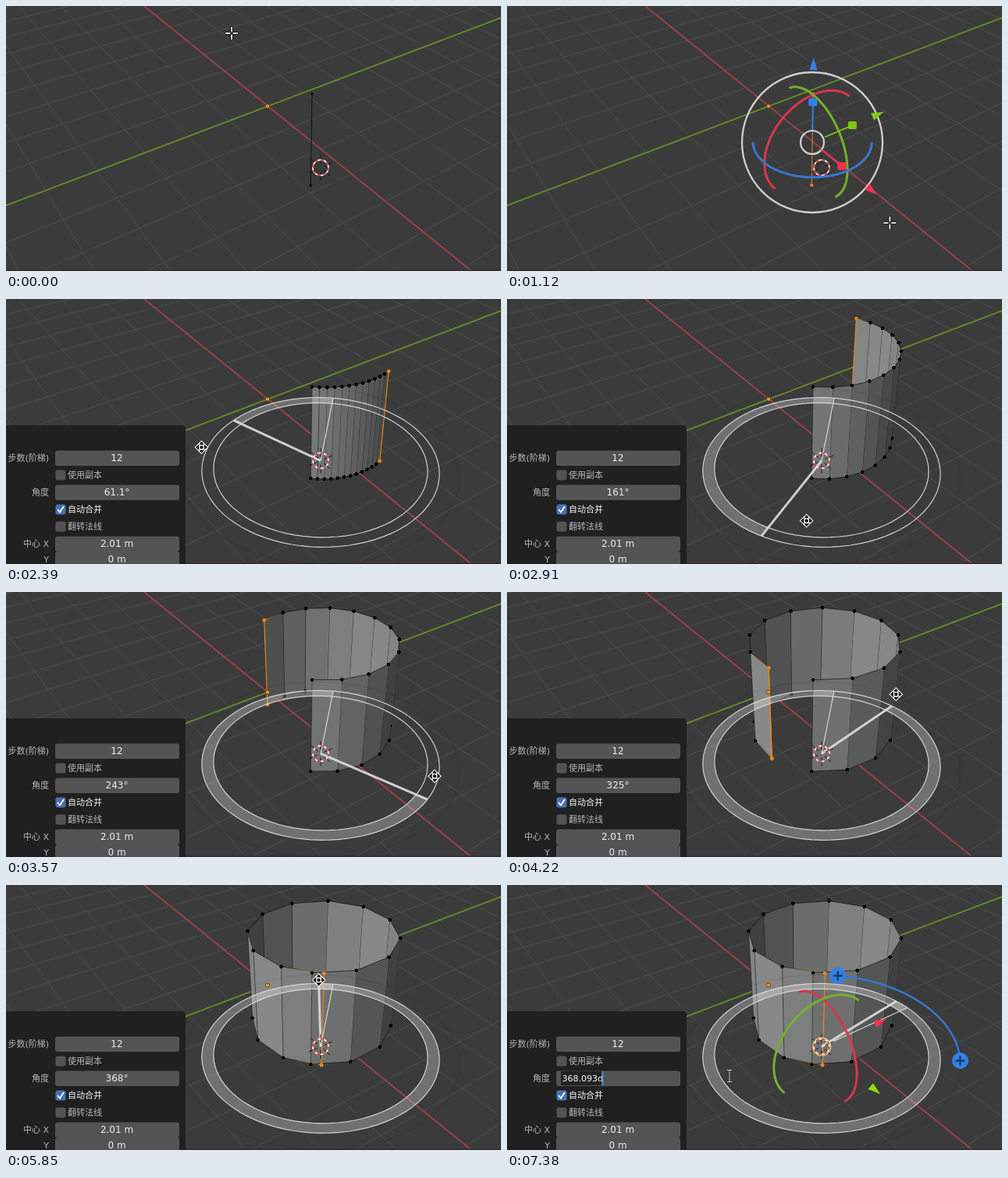
An HTML page with a canvas that plays this animation: 634 by 340 pixels, repeating every 8 s.

```html
<!DOCTYPE html>
<html lang="zh">
<head>
<meta charset="utf-8">
<style>
html, body { margin: 0; width: 100%; height: 100%; overflow: hidden; background: #3b3b3b; }
canvas { display: block; }
</style>
</head>
<body>
<canvas id="stage" width="634" height="340"></canvas>
<script>
const c = document.getElementById('stage').getContext('2d');
const FONT = '"DejaVu Sans", "Noto Sans CJK SC", "Noto Sans CJK", sans-serif';
const ORANGE = '#f0861a', RED = '#d9364c', GREEN = '#74b02b', BLUE = '#3579d0', WIRE = 'rgba(20,20,20,.75)';
const CENTER = 1.345, OUTER = 1.755, INNER = 1.585, ORBIT = 2.04;
const STEP = 74.2, SELECT = 600, TOOL = 1170, HOVER = 1400, DRAG = 1690, RELEASE = 5900, EDIT = 6720;

// Key points: [time, angle, pointer reach] and [time, x, y]
const spinKeys = [[1700, 2, 2.05], [2360, 61.1, 1.85], [2880, 161, 1.3], [4210, 325, 2.1], [5570, 368.093, 1.87]];
const mouseKeys = [[0, 289, 35], [290, 530, 292], [450, 530, 292], [600, 582, 288], [1095, 491, 280],
  [1470, 423, 116], [5840, 399, 123], [6640, 178, 240], [7180, 178, 240], [7320, 285, 245]];

function at(keys, t) {
  const i = keys.findIndex(k => k[0] > t);
  if (i < 0) return keys[keys.length - 1].slice(1);
  if (i === 0) return keys[0].slice(1);
  const p = keys[i - 1], q = keys[i], f = (t - p[0]) / (q[0] - p[0]);
  return p.slice(1).map((v, j) => v + (q[j + 1] - v) * f);
}

const rad = d => d * Math.PI / 180;
const depth = d => -.1007 * Math.cos(rad(d)) - .014 * Math.sin(rad(d));

// Perspective of a point at angle d, radius k, depth h below the rim
function polar(d, k, h = CENTER) {
  const u = k * Math.cos(rad(d)), v = k * Math.sin(rad(d));
  const w = 1 + .105 * h + k * depth(d);
  return [(406.8 + 39.5 * h - 54.3 * u + 91.13 * v) / w, (62.1 + 129.8 * h + 39.2 * u + 6.92 * v) / w];
}
const hub = polar(0, 0);

const floorW = (x, y) => 1.2268 - .0555 * x + .0415 * y;
function floorPt(x, y) {
  const w = floorW(x, y);
  return [(411.6 + 19.17 * x + 71.97 * y) / w, (158 + 23.43 * x - 16.51 * y) / w];
}

function trace(pts, close) {
  c.beginPath();
  pts.forEach(p => c.lineTo(p[0], p[1]));
  if (close) c.closePath();
}
function line(pts, color, width = 1, close = false) {
  trace(pts, close);
  c.strokeStyle = color;
  c.lineWidth = width;
  c.stroke();
}
function shape(pts, color) { trace(pts, true); c.fillStyle = color; c.fill(); }
function rect(x, y, w, h, color, r = 0) {
  c.beginPath();
  c.roundRect(x, y, w, h, r);
  c.fillStyle = color;
  c.fill();
}
function circle([x, y], r, fill, stroke, width = 1) {
  c.beginPath();
  c.arc(x, y, r, 0, 7);
  if (fill) { c.fillStyle = fill; c.fill(); }
  if (stroke) { c.strokeStyle = stroke; c.lineWidth = width; c.stroke(); }
}
const sweep = (from, to, fn) => Array.from({ length: 91 }, (_, i) => fn(from + (to - from) * i / 90));
const arc = (from, to, k) => sweep(from, to, d => polar(d, k));

function drawFloor() {
  rect(0, 0, 634, 340, '#3b3b3b');
  for (let i = -23; i < 24; i++) {
    if (!i) continue;
    line([floorPt(-40, i), floorPt((floorW(0, i) - .08) / .0555, i)], '#4a4a4a');
    line([floorPt(i, (.08 - floorW(i, 0)) / .0415), floorPt(i, 45)], '#4a4a4a');
  }
  line([[0, 256], [634, 15]], '#678f2a', 1.7);
  line([[177, 0], [595, 339]], '#a03f4a', 1.8);
  rect(0, 338.5, 634, 1.5, '#302b2d');
}

function drawEdge(selected) {
  const ends = [polar(0, 1, 0), polar(0, 1, 1)], color = selected ? ORANGE : '#111';
  line(ends, color);
  ends.forEach(p => circle(p, 2, color));
}

function shade(d) {
  const v = Math.round(Math.max(64, 86 + 50 * Math.cos(rad(d - 315))));
  return `rgb(${v - 1},${v + 1},${v + 1})`;
}

function drawMesh(angle) {
  const step = angle / 12, mid = i => (i + .5) * step;
  const [top, low] = [0, 1].map(h => Array.from({ length: 13 }, (_, i) => polar(i * step, 1, h)));
  const order = [...Array(12).keys()].sort((a, b) => depth(mid(b)) - depth(mid(a)));
  const lastEdge = () => {
    line([top[12], low[12]], ORANGE, 1.1);
    circle(top[12], 2.4, ORANGE);
    circle(low[12], 2.4, ORANGE);
  };
  for (const i of order) {
    const [a, b, p, q] = [top[i], top[i + 1], low[i], low[i + 1]];
    const outside = (b[0] - a[0]) * (p[1] - a[1]) - (b[1] - a[1]) * (p[0] - a[0]) > 0;
    shape([a, b, q, p], shade(mid(i) + (outside ? 0 : 180)));
    line([a, p], WIRE, .7);
    for (const [m, n] of [[a, b], [p, q]]) {
      const fade = c.createLinearGradient(...m, ...n);
      fade.addColorStop(0, WIRE);
      fade.addColorStop(1, i === 11 ? ORANGE : WIRE);
      line([m, n], fade);
    }
    [a, b, p, q].forEach(v => circle(v, 2.2, '#000'));
    if (i === 11) lastEdge();
  }
  if (angle > 300) lastEdge();
}

function drawDial(start, angle) {
  const white = 'rgba(222,222,222,.9)';
  for (let rest = angle, from = start; rest > 0; rest -= 360) {
    const to = from + Math.min(rest, 360);
    shape([...arc(from, to, OUTER), ...arc(to, from, INNER)], 'rgba(255,255,255,.27)');
  }
  line(arc(0, 360, OUTER), white, 1.2);
  line(arc(0, 360, INNER), white, 1.2);
  line([hub, polar(start, OUTER)], white, 1.2);
  line([hub, polar(start + angle, OUTER)], white, 3);
}

function drawCursor3d() {
  const [x, y] = hub;
  for (const [dx, dy] of [[0, 1], [.92, -.4], [.75, .66]])
    for (const s of [-5, 5, ])
      line([[x + s * dx, y + s * dy], [x + s * dx * 3.2, y + s * dy * 3.2]], '#151515');
  circle(hub, 10, null, '#f2f2f2', 1.6);
  c.setLineDash([3.93, 3.93]);
  circle(hub, 10, null, '#d8282c', 1.6);
  c.setLineDash([]);
}

// Handles share one set of screen axes
const AX = [45, 36.4], AY = [61.2, -26.1], AZ = [1, -61.2];
const along = ([x, y], [dx, dy], f) => [x + dx * f, y + dy * f];

function halfRing(o, u, v, from, color) {
  line(sweep(from, from + 180, d => along(along(o, u, Math.cos(rad(d))), v, Math.sin(rad(d)))), color, 3);
}
function cone(o, axis, reach, color) {
  const tip = along(o, axis, reach), n = Math.hypot(...axis), d = axis.map(v => v / n);
  const base = along(tip, d, -16), side = [-d[1], d[0]];
  shape([tip, along(base, side, 5), along(base, side, -5)], color);
}
function drawTransform() {
  const o = [391, 175];
  halfRing(o, AY, AZ, 40, RED);
  halfRing(o, AX, AZ, -48, GREEN);
  halfRing(o, AX, AY, -126, BLUE);
  circle(o, 90, null, '#cfcfcf', 2.3);
  circle(o, 15, null, '#cfcfcf', 2.2);
  for (const [axis, color, reach] of [[AZ, '#2f83e8', 1.78], [AX, '#f0344f', 1.84], [AY, '#7cc814', 1.5]]) {
    const [x, y] = along(o, axis, .84);
    line([along(o, axis, .26), [x, y]], color, 1.8);
    rect(x - 5.5, y - 5, 11, 10, color, 2);
    cone(o, axis, reach, color);
  }
}

function drawPlus([x, y], color) {
  circle([x, y], 10.5, color);
  line([[x - 6, y], [x + 6, y]], '#173a6c', 2.4);
  line([[x, y - 6], [x, y + 6]], '#173a6c', 2.4);
}
function drawSpin(hot) {
  halfRing(hub, AX, AZ, -48, RED);
  halfRing(hub, AY, AZ, 40, GREEN);
  cone(hub, AY, 1.36, '#f5344f');
  cone(hub, AX, 1.67, '#88e000');
  line(arc(90, 180, ORBIT), BLUE, 2.4);
  drawPlus(polar(90, ORBIT), '#3380e4');
  drawPlus(polar(180, ORBIT), hot ? '#5ba3ff' : '#3380e4');
  circle(hub, 11.5, null, 'rgba(255,222,110,.75)', 1.5);
}

function label(s, x, y, align, color = '#b8b8b8', size = 11) {
  c.font = `${size}px ${FONT}`;
  c.textAlign = align;
  c.fillStyle = color;
  c.fillText(s, x, y + size * .37);
}
function field(name, value, y, color = '#545454') {
  label(name, 55, y, 'right');
  rect(63, y - 9.5, 159, 19.5, color, 3);
  label(value, 142, y, 'center', '#ececec', 12);
}
function check(name, y, on) {
  rect(63.5, y - 6.5, 13, 13, on ? '#4772b3' : '#545454', 2.5);
  if (on) line([[66, y], [69, y + 3.5], [74, y - 4]], '#fff', 1.8);
  label(name, 79, y, 'left', on ? '#f4f4f4' : '#b8b8b8');
}

function drawPanel(t, angle) {
  const editing = t >= EDIT, shown = (angle < 100 ? angle.toFixed(1) : Math.round(angle)) + '°';
  rect(0, 162, 230, 178, '#202020', [0, 4, 0, 0]);
  field('步数(阶梯)', '12', 204);
  check('使用副本', 226, false);
  field('角度', editing ? '' : shown, 248, t > 6350 && !editing ? '#666' : '#545454');
  if (editing) {
    rect(69, 239, 52, 18, '#222');
    label('368.093d', 70.5, 248, 'left', '#fff');
    rect(121.5, 239, 2, 18, '#3c8fd8');
  }
  check('自动合并', 270, true);
  check('翻转法线', 292, false);
  field('中心 X', '2.01 m', 314);
  field('Y', '0 m', 333.5);
}

function drawMouse(kind, x, y) {
  c.save();
  c.translate(x, y);
  if (kind === 'cross') {
    for (const [color, w, end] of [['#111', 4, 8.5], ['#fff', 1.8, 8]])
      for (const s of [-1, 1]) {
        line([[s * 2, 0], [s * end, 0]], color, w);
        line([[0, s * 2], [0, s * end]], color, w);
      }
  } else if (kind === 'move') {
    for (let i = 0; i < 4; i++) {
      const tri = [[0, -7.5], [4, -3.2], [-4, -3.2]];
      line(tri, '#fff', 2, true);
      shape(tri, '#111');
      c.rotate(Math.PI / 2);
    }
    circle([0, 0], 2.8, '#111', '#fff', 1.2);
  } else if (kind === 'text') {
    const bar = [[-3, -7.5], [3, -7.5], [0, -7.5], [0, 7.5], [-3, 7.5], [3, 7.5]];
    line(bar, '#222', 2.4);
    line(bar, '#ddd', 1);
  } else {
    const arrow = [[0, 0], [0, 14], [4, 11], [10, 10]];
    shape(arrow, '#111');
    line(arrow, '#fff', 1, true);
  }
  c.restore();
}

function draw(now) {
  const time = now % 8000;
  const t = time < 60 ? 0 : 60 + Math.floor((time - 60) / STEP) * STEP;
  const spun = t >= DRAG, released = t >= RELEASE, dragging = spun && !released;
  const [angle, reach] = at(spinKeys, t);
  let [x, y] = at(mouseKeys, t);
  // The pointer runs slightly ahead of the shown angle
  if (dragging) [x, y] = polar(181 + at(spinKeys, t + 140)[0], reach);

  drawFloor();
  if (spun) drawMesh(angle);
  else drawEdge(t >= SELECT);
  if (t >= HOVER) line(arc(0, 360, ORBIT), 'rgba(0,0,0,.07)', 1.5);
  circle([335, 128.5], 2.6, '#ff9c28', '#4a3010', .8);
  if (spun) drawDial(released ? 135 : 181, angle);
  drawCursor3d();
  if (t >= SELECT && t < TOOL) drawTransform();
  if (t >= TOOL && !dragging) drawSpin(t >= HOVER && !released);
  if (t >= 60 && t < SELECT) {
    c.setLineDash([4, 4]);
    line([[295.5, 38.5], [x, 38.5], [x, y], [295.5, y]], '#d0d0d0', 1, true);
    c.setLineDash([]);
  }
  if (spun) drawPanel(t, angle);
  drawMouse(dragging ? 'move' : t >= EDIT ? 'text' : x < 230 && y > 162 ? 'arrow' : 'cross', x, y);
}

const begin = performance.now();
function tick() {
  draw(performance.now() - begin);
  requestAnimationFrame(tick);
}
tick();
</script>
</body>
</html>
```
